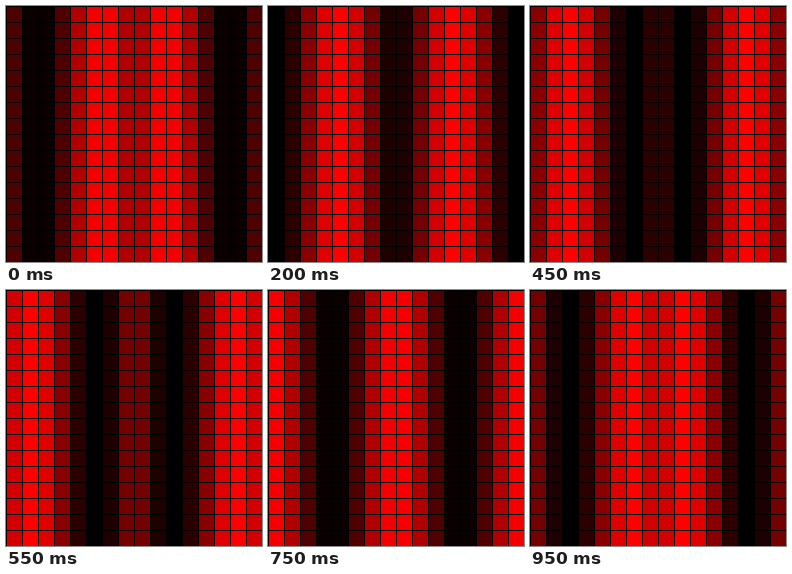
An HTML page that plays this animation: 256 by 256 pixels, repeating every 1 s.

```html
<!DOCTYPE html>
<html lang="en">
<head>
<meta charset="utf-8">
<title>Red wave grid</title>
<style>
  html, body { margin: 0; width: 100%; height: 100%; overflow: hidden; background: #000; }
  svg { display: block; width: 100%; height: 100%; }
</style>
</head>
<body>
<svg viewBox="0 0 256 256" shape-rendering="crispEdges"></svg>
<script>
const COUNT = 16, CELL = 16, LOOP = 1000, STEP = 50, WAVELENGTH = 8;
const svg = document.querySelector('svg');

function addRect(x, y, width, height) {
  const rect = document.createElementNS('http://www.w3.org/2000/svg', 'rect');
  const attrs = { x, y, width, height };
  for (const key in attrs) rect.setAttribute(key, attrs[key]);
  svg.append(rect);
  return rect;
}

const columns = [];
for (let i = 0; i < COUNT; i++) columns.push(addRect(i * CELL + 1, 0, CELL - 1, 256));
// Black rows split the columns into cells.
for (let i = 0; i < COUNT; i++) addRect(0, i * CELL, 256, 1);

// A sine wave travels outward from the centre in discrete steps.
function draw(ms) {
  const phase = Math.floor((ms % LOOP) / STEP) * STEP / LOOP;
  columns.forEach((column, i) => {
    const distance = Math.abs(i - (COUNT - 1) / 2);
    const wave = Math.sin(2 * Math.PI * (distance / WAVELENGTH - phase));
    column.setAttribute('fill', `rgb(${Math.round(127.5 + 127.5 * wave)},0,0)`);
  });
}

const start = performance.now();
function tick() {
  draw(performance.now() - start);
  requestAnimationFrame(tick);
}
tick();
</script>
</body>
</html>
```
